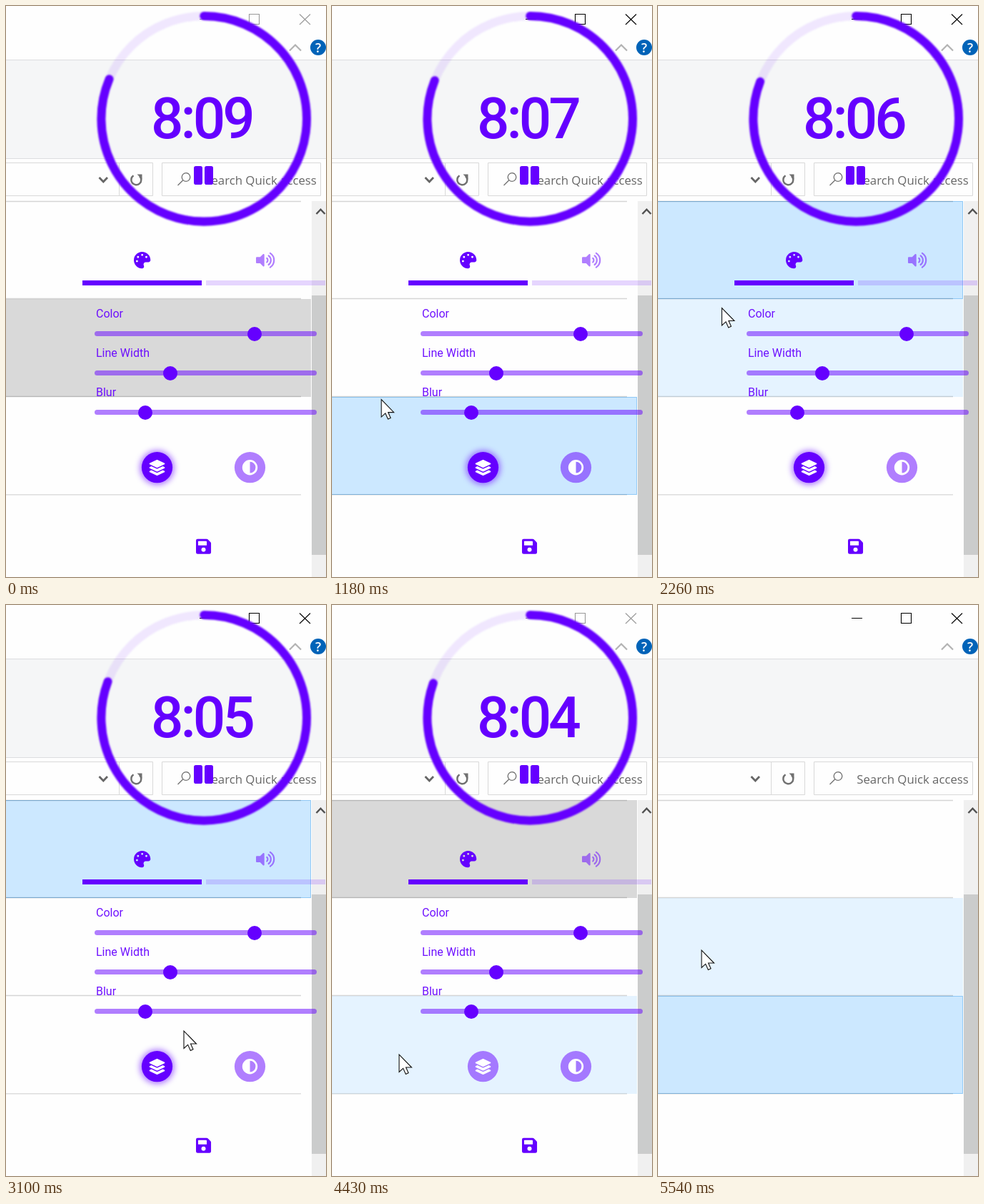
An HTML page that plays this animation: 448x799 px, repeating every 5.82 s.

```html
<!DOCTYPE html>
<html lang="en">
<head>
<meta charset="utf-8">
<title>Timer overlay</title>
<style>
  html, body { margin: 0; width: 100%; height: 100%; overflow: hidden; background: #fff; }
  svg { display: block; width: 100vw; height: 100vh; }
  .line { fill: none; stroke-linecap: butt; }
  .label { font: 400 16px Roboto, sans-serif; opacity: .93; }
  .clock { font: 500 80px Roboto, sans-serif; letter-spacing: -4px; }
  .search { font: 400 16.8px "Open Sans", sans-serif; fill: #666; }
  .help { font: 600 18px "Open Sans", sans-serif; fill: #fff; text-anchor: middle; }
</style>
</head>
<body>
<svg viewBox="0 0 448 799" xmlns="http://www.w3.org/2000/svg">
  <defs>
    <filter id="soft" x="-10%" y="-10%" width="120%" height="120%"><feGaussianBlur stdDeviation="1.3"/></filter>
    <filter id="edge" x="-5%" y="-50%" width="110%" height="200%"><feGaussianBlur stdDeviation=".6"/></filter>
    <filter id="glow" x="-50%" y="-50%" width="200%" height="200%"><feGaussianBlur stdDeviation="4"/></filter>
    <path id="tier" d="M70 210L12 236Q-8 256 12 276L245 382Q256 386 267 382L500 276Q520 256 500 236L442 210L280 283Q256 293 232 283Z"/>
  </defs>

  <!-- window -->
  <rect width="448" height="799" fill="#fefefe"/>
  <rect y="75" width="448" height="139" fill="#dcdddf"/>
  <rect y="76" width="448" height="137" fill="#f5f6f7"/>
  <g id="buttons" class="line" stroke-width="1.1">
    <path d="M271 18.5H286M340.5 11.5H354.5V25.5H340.5Z"/>
    <path d="M411 11.5L426 26M426 11.5L411 26"/>
  </g>
  <path class="line" d="M397 62.5L405 54.5L413 62.5" stroke="#b2b2b2" stroke-width="2.2"/>
  <circle cx="437" cy="58" r="11" fill="#0063b8"/>
  <text class="help" x="437" y="64.5">?</text>
  <g class="line" stroke="#d9d9d9">
    <path d="M-2 219.5H205.5V265.5H-2M158.5 219.5V265.5"/>
    <path d="M218.5 219.5H440.5V265.5H218.5Z"/>
  </g>
  <path class="line" d="M130.5 240L136.3 246L142 240" stroke="#666" stroke-width="2.8"/>
  <path class="line" d="M178.5 237.3A7 7 0 1 0 187 238" stroke="#707070" stroke-width="2.5"/>
  <path d="M183.5 235.5H190.5V242.5Z" fill="#707070"/>
  <g class="line" stroke="#707070" stroke-width="1.3">
    <circle cx="252" cy="239.5" r="5.8"/>
    <path d="M247.8 243.8L240.5 251"/>
  </g>
  <text class="search" x="278.2" y="250">Search Quick access</text>

  <!-- list -->
  <g id="rows"></g>
  <path class="line" d="M0 273.5H413M0 409.5H413M0 546.5H413M0 683.8H413" stroke="#000" stroke-opacity=".16" stroke-width="1.3"/>
  <rect x="428" y="273" width="20" height="526" fill="#f0f0f0"/>
  <rect x="428" y="405" width="20" height="363" fill="#cbcccc"/>
  <path class="line" d="M434.5 291L440.5 284.7L446.5 291" stroke="#505050" stroke-width="2.4"/>

  <!-- overlay -->
  <g id="overlay" fill="#6500ff">
    <g fill="none" stroke="#6500ff" stroke-width="12" filter="url(#soft)">
      <circle cx="277.2" cy="157.8" r="143.8" stroke-opacity=".09"/>
      <path id="arc" stroke-linecap="round"/>
    </g>
    <text id="clock" class="clock" x="203" y="185"></text>
    <rect x="263" y="224" width="12" height="26" rx="2.8"/>
    <rect x="278" y="224" width="12" height="26" rx="2.8"/>

    <path transform="translate(179 344) scale(.0455)" fill-rule="evenodd" d="M204 5C105 24 25 104 5 203C-32 390 137 530 264 510C305 504 325 456 306 418C283 373 316 320 367 320H447C483 320 512 290 512 255C511 97 368-27 204 5ZM96 320a32 32 0 1 1 0-64a32 32 0 1 1 0 64M128 192a32 32 0 1 1 0-64a32 32 0 1 1 0 64M256 128a32 32 0 1 1 0-64a32 32 0 1 1 0 64M384 192a32 32 0 1 1 0-64a32 32 0 1 1 0 64"/>
    <g transform="translate(350 344) scale(.0457)" opacity=".5">
      <path d="M215 71L126 160H24Q0 160 0 184V328Q0 352 24 352H126L215 441C230 456 256 445 256 424V88C256 67 230 56 215 71Z"/>
      <path fill="none" stroke="#6500ff" stroke-width="48" stroke-linecap="round" d="M333 195A82 82 0 0 1 333 317M386 118A171 171 0 0 1 386 394M435 40A258 258 0 0 1 435 472"/>
    </g>
    <g filter="url(#edge)">
      <rect x="107" y="384" width="167" height="7"/>
      <rect x="280" y="384" width="167" height="7" opacity=".16"/>
    </g>

    <g id="sliders"></g>

    <circle id="halo" cx="211.5" cy="646" r="24" opacity=".55" filter="url(#glow)"/>
    <circle id="layers" cx="211.5" cy="645.7" r="21.6"/>
    <g fill="#fff" transform="translate(200.5 635) scale(.043)">
      <path d="M12 148L245 254Q256 258 267 254L500 148Q520 128 500 108L267 2Q256-2 245 2L12 108Q-8 128 12 148Z"/>
      <use href="#tier"/>
      <use href="#tier" y="128"/>
    </g>
    <circle cx="341.5" cy="645.7" r="21.6" opacity=".5"/>
    <circle cx="341.5" cy="645.7" r="9.3" fill="none" stroke="#fff" stroke-width="2.8"/>
    <path d="M341.5 636.4A9.3 9.3 0 0 0 341.5 655Z" fill="#fff"/>

    <path transform="translate(266 744.2) scale(.047)" fill-rule="evenodd" d="M434 130L350 46Q336 32 316 32H48Q0 32 0 80V432Q0 480 48 480H400Q448 480 448 432V164Q448 144 434 130ZM224 416a64 64 0 1 1 0-128a64 64 0 1 1 0 128M320 111V212Q320 224 308 224H76Q64 224 64 212V108Q64 96 76 96H304Z"/>
  </g>

  <path id="cursor" d="M0 0V24.5L5.6 19.3L9.3 27.5L13 25.8L9.5 18H17.5Z" fill="#fff" stroke="#111" stroke-width="1.1"/>
</svg>
<script>
const LOOP = 5820;
const $ = id => document.getElementById(id);

function add(parent, tag, attrs, text) {
  const el = document.createElementNS('http://www.w3.org/2000/svg', tag);
  set(el, attrs);
  if (text) el.textContent = text;
  parent.appendChild(el);
  return el;
}
function set(el, attrs) {
  for (const k in attrs) el.setAttribute(k, attrs[k]);
}

const sliders = [['Color', 458.5, 348], ['Line Width', 513.5, 230], ['Blur', 568.5, 195]];
for (const [name, y, thumb] of sliders) {
  const g = $('sliders');
  add(g, 'text', { class: 'label', x: 126, y: y - 22.5 }, name);
  add(g, 'rect', { x: 124, y: y - 3.5, width: 311, height: 7, rx: 3.5, opacity: .5 });
  add(g, 'circle', { cx: thumb, cy: y + .5, r: 10 });
}

const edges = [273, 410, 547, 684];
const rows = [0, 1, 2].map(i => add($('rows'), 'rect',
  { x: -2, y: edges[i] + .5, width: 428.5, height: edges[i + 1] - edges[i] - 1 }));
const styles = {
  none: ['none', 'none'],
  grey: ['#d9d9d9', '#d9d9d9'],
  hover: ['#e5f3ff', '#e5f3ff'],
  selected: ['#cce8ff', '#8fc8f5']
};

// time, selected row, window focused, layers button on, overlay shown
const states = [
  [0, 1, false, true, true],
  [1040, 2, true, true, true],
  [1390, 1, true, true, true],
  [1980, 0, true, true, true],
  [3660, 0, false, false, true],
  [4640, 2, true, false, false]
];

// time, x, y of the pointer tip
const path = [
  [0, -30, 645], [60, -30, 645], [620, 80, 629], [1040, 78, 627],
  [1300, 62, 490], [1420, 58, 470], [1600, 42, 384], [1800, 46, 345],
  [2050, 50, 345], [2540, 150, 542], [3100, 249, 596], [3200, 250, 598],
  [3520, 215, 631], [3940, 215, 631], [4430, 94, 629], [4700, 90, 625],
  [5060, 88, 618], [5540, 61, 483]
];

function pointer(t) {
  const i = path.findIndex(p => p[0] > t);
  if (i < 0) return path[path.length - 1].slice(1);
  const [a, b] = [path[i - 1], path[i]];
  const u = (t - a[0]) / (b[0] - a[0]);
  const e = u * u * (3 - 2 * u);
  return [a[1] + (b[1] - a[1]) * e, a[2] + (b[2] - a[2]) * e];
}

function step(t) {
  if (t < 60) return 0;
  const [from, to] = t < 1980 ? [60, 1880] : t < 5120 ? [1980, 5060] : [5120, 5540];
  return Math.min(to, from + 70 * Math.floor((t - from) / 70));
}

function render(now) {
  const t = step(now % LOOP);
  const [, sel, focused, layersOn, shown] = states.filter(s => s[0] <= t).pop();
  const [x, y] = pointer(t);

  // The overlay panel keeps hovers from reaching the list.
  const free = x >= 0 && (x < 106 || !shown);
  rows.forEach((row, i) => {
    const over = free && y >= edges[i] && y < edges[i + 1];
    const kind = i === sel ? (focused ? 'selected' : 'grey') : over ? 'hover' : 'none';
    set(row, { fill: styles[kind][0], stroke: styles[kind][1] });
  });

  set($('buttons'), { stroke: focused ? '#000' : '#999' });
  set($('overlay'), { display: shown ? 'inline' : 'none' });
  set($('halo'), { display: layersOn ? 'inline' : 'none' });
  set($('layers'), { opacity: layersOn ? 1 : .5 });
  set($('cursor'), { transform: `translate(${x.toFixed(1)} ${y.toFixed(1)})` });

  const left = 489 - Math.max(0, Math.floor((t + 940) / 1000));
  $('clock').textContent = Math.floor(left / 60) + ':' + String(left % 60).padStart(2, '0');

  const a = (292.7 - .00068 * t) * Math.PI / 180;
  const ex = 277.2 + 143.8 * Math.sin(a), ey = 157.8 - 143.8 * Math.cos(a);
  set($('arc'), { d: `M277.2 14A143.8 143.8 0 1 1 ${ex.toFixed(2)} ${ey.toFixed(2)}` });
}

const start = performance.now();
function tick() {
  render(performance.now() - start);
  requestAnimationFrame(tick);
}
tick();
</script>
</body>
</html>
```
